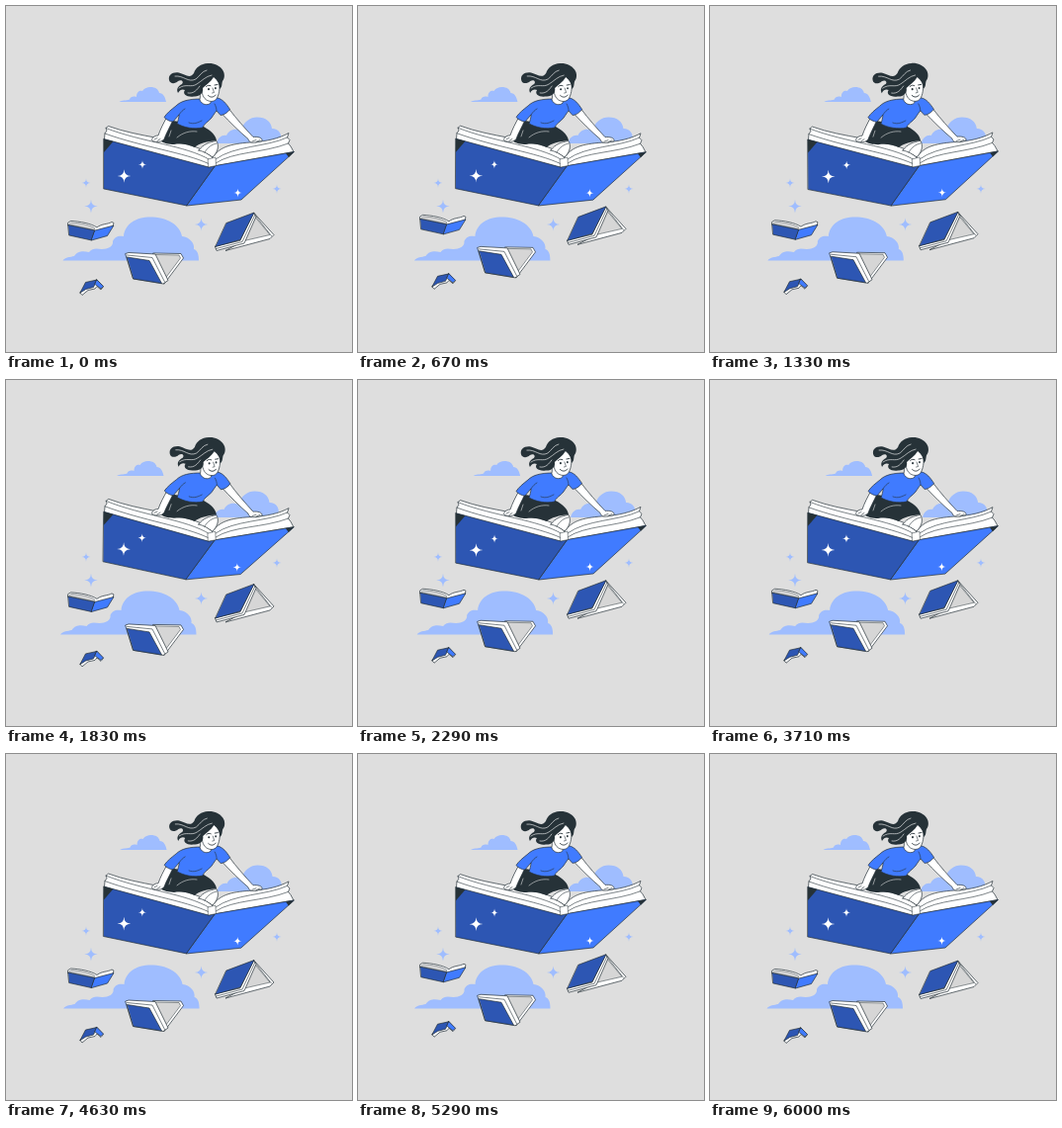
An HTML page with a canvas that plays this animation: 350 by 350 pixels, repeating every 6040 ms.

```html
<!DOCTYPE html>
<html lang="en">
<head>
<meta charset="utf-8">
<title>Flying book</title>
<style>
html, body { margin: 0; width: 100%; height: 100%; overflow: hidden; background: #dedede; }
canvas { display: block; width: 350px; height: 350px; }
</style>
</head>
<body>
<canvas id="stage"></canvas>
<script>
const LOOP = 6040, SPAN = 6000, BEAT = 1500, SIZE = 350;
const INK = '#263238', BLUE = '#407bff', DEEP = '#2d56b3', SKY = '#9fbdff', WHITE = '#fff', GREY = '#d6d6d6', PAPER = '#dedede';

const canvas = document.getElementById('stage');
const ctx = canvas.getContext('2d');
const ratio = window.devicePixelRatio || 1;
canvas.width = canvas.height = SIZE * ratio;

function shape(d, fill, stroke, width = 0.7) {
  const path = new Path2D(d);
  if (fill) { ctx.fillStyle = fill; ctx.fill(path); }
  if (stroke) { ctx.strokeStyle = stroke; ctx.lineWidth = width; ctx.stroke(path); }
}
const inked = (d, fill) => shape(d, fill, INK);
const line = (d, color = INK, width = 0.6) => shape(d, null, color, width);

function star(x, y, r, color) {
  const k = r * 0.03;
  ctx.beginPath();
  ctx.moveTo(x, y - r);
  ctx.quadraticCurveTo(x + k, y - k, x + r, y);
  ctx.quadraticCurveTo(x + k, y + k, x, y + r);
  ctx.quadraticCurveTo(x - k, y + k, x - r, y);
  ctx.quadraticCurveTo(x - k, y - k, x, y - r);
  ctx.fillStyle = color;
  ctx.fill();
}

function moved(dx, dy, draw) {
  ctx.save();
  ctx.translate(dx, dy);
  draw();
  ctx.restore();
}

const ease = p => (1 - Math.cos(Math.PI * p)) / 2;

// Sideways shake, one stop every tenth of the span
const STOPS = [0, -1, 2, -4, 4, -4, 4, -4, 2, -1, 0];
function shake(t) {
  const p = t / SPAN * 10, i = Math.min(9, Math.floor(p));
  return 0.63 * (STOPS[i] + (STOPS[i + 1] - STOPS[i]) * ease(p - i));
}
const float = t => -6.3 * ease(2 * t / BEAT);

// Triangle wave: up at 1/4, down at 3/4
function sway(t) {
  const p = t / BEAT % 1;
  return p < 0.25 ? 4 * p : p < 0.75 ? 2 - 4 * p : 4 * p - 4;
}

function clouds() {
  shape('M114.5 97C117 95 121 96 125 94.5C126 91.5 129 91 132 92C132 86 136 85 138 86C140 83 143 82 146 82C151 82 154 84 155 88C159 88 161 92 162 97Z', SKY);
  shape('M213 139C214 133 219 130 223 131C225 126 231 123 238 126C240 117 247 112.5 254 112.5C263 112.5 268 117 269 124C276 124 279 130 278 134C280 134 281 137 281 139Z', SKY);
  shape('M57.5 257.5C60 254 65 254 69 253C73 247 79 248 84 249C88 244 93 246 97 246C103 246 109 243 108 238C110 233 114 232 119 233C120 221 131 213.5 146 213.5C162 213.5 176 221 178 233C186 234 191 240 190 246C194 247 195 252 195 257.5Z', SKY);
}

function bigBook() {
  // page blocks
  inked('M99.5 135L100 129L102 126L101 123.5L103.5 121.5C135 133 172 134 198 145L209 153L213 162L205 163.5Z', WHITE);
  inked('M209 153C216 143 226 139.5 247 138C264 137 276 134 286 128.5L284.5 133L287 135.5L285.5 139L288 142L291 147.5L211 162Z', WHITE);
  line('M101 123.5C138 138 182 141 206 155.5');
  line('M100 129C139 143 180 148 205 159.5');
  line('M284.5 133C263 143 231 141 212 155');
  line('M285.5 139C260 149 230 147 212 159');
  inked('M195 146C199 140 206 137.5 213 136.5C216 142 214 148 209 153C205 150 200 147 195 146Z', WHITE);
  line('M201 148C204 143 208 140 213 139');
  // covers
  inked('M99 134.5L205 163L212 161.5L183 202L99 185Z', DEEP);
  inked('M212 161.5L291.5 147.5L238 196L183 202Z', BLUE);
  shape('M99 134.5L108.5 137L99 148Z', INK);
  shape('M291.5 147.5L283 149L286 153Z', INK);
  shape('M204.5 155L212 153L212.5 161.5L205 163Z', WHITE, INK, 0.5);
  star(119.5, 172, 6.8, WHITE);
  star(138, 160.5, 4.2, WHITE);
  star(234.5, 189, 4.2, WHITE);
}

function rider() {
  // legs
  shape('M169 116C164 121 160 128 156 136C159 139 165 140 170 140C178 139 184 140 191 143C195 139 204 137 213 136C212 129 204 124 198 121Z', INK);
  line('M173 133C179 128 186 126 193 127', WHITE, 0.5);
  line('M167 126L165 132', WHITE, 0.5);
  // forearms and hands
  inked('M163 112C159 119 156 125 154 131C150 131 146.5 134 148 136.5C152 138 158 138 160 134.5C162 129 166 122 169 115Z', WHITE);
  line('M150 135L153 133.5M153 136.5L156 134.5');
  inked('M218 108.5C226 117 236 127 245 134.5C246 139 250 138 253 138L259 136.5C260 133 254 132 250 132.5C242 124 233 114 225.5 104Z', WHITE);
  line('M249 137L253 135.5M253 137.5L257 135.5');
  // top
  inked('M197 94C185 94 177 96 172 101C167 105 163 108 160 112.5C162 115 166 117 169 117L175 110C175 113 174 116 173 119C180 123 190 125 199 123C200 119 205 117 208 113C210 110 212 107 213 106L217 110.5C221 110 224 108 226.5 104.5C223 99 219 94 214 93Z', BLUE);
  line('M175 110C177 107 179 105 181 104M213 106C213 103 212 101 211 99M185 118C190 120 194 118 198 116');
  // neck and face
  inked('M196 86C197 91 196 94 196 95C198 100 204 101 207 98L208 92Z', WHITE);
  inked('M199 79C197 84 198 90 201 93.5C204 97 211 98 213.5 93C216 88 217 80 215 73L207 70Z', WHITE);
  // hair
  shape('M216 84C219 82 218 79 219 76C221.5 73 221.5 68 219 64.5C216 60 210 57.5 204 58C197 58.5 192 62 190 68C186 74 181 69 175 67.5C168 66.5 164 70 165 75C166 79 171 79 174 76C178 74 180 77 178 79C174 81 172 84 174 88C176 84 179 84 181 85C178 89 183 92.5 190 91.5C196 92 200 88 199 83C202 80 207 77 210 72C214 75 216 79 216 84Z', INK);
  line('M171 71C180 70 184 78 192 74C196 71 198 66 203 65', WHITE, 0.6);
  line('M175 83C182 78 187 83 193 79C198 76 202 71 208 70', WHITE, 0.6);
  line('M184 88C190 89 193 85 196 81', WHITE, 0.6);
  // features
  line('M202.5 81.5C204 80 205.5 80 207 80.7M211 80L214 79.5', INK, 0.9);
  shape('M204 84.2a1 1.1 0 1 0 2 0a1 1.1 0 1 0 -2 0ZM211 83.2a.9 1.1 0 1 0 1.8 0a.9 1.1 0 1 0 -1.8 0Z', INK);
  line('M209 83L210.5 87.5L208.5 88');
  line('M204.5 90.5C207 93 210 92.5 212 90', INK, 0.9);
}

function openBook() {
  inked('M63 219L65.5 217.5C75 218 86 220 92 224C97 220 103 221 107 218.5L109 219.5L108 223L90 228L63 222Z', WHITE);
  shape('M66 219C75 219.5 84 221 90 225L89 226.5L64 221Z', GREY, INK, 0.4);
  inked('M63 221.5L90 227L86.5 237L64 232Z', DEEP);
  inked('M90 227L109 222L102.5 232.5L86.5 237Z', BLUE);
}

function tentBook() {
  inked('M251 209.5L271 231.5L267 235.5L222 247.5L240 238Z', WHITE);
  shape('M252.5 214L267 231.5L241 237.5Z', GREY, INK, 0.5);
  line('M251.5 211L268.5 232.5');
  inked('M211.5 243.5L213 247.5L241 240L253 213L250.5 209L237 237Z', WHITE);
  line('M212.5 245.5L239 238.5L252 211');
  inked('M223 219.5L251 209L237 236.5L212 243.5Z', DEEP);
}

function wideBook() {
  inked('M149 250L177 250.5L179.5 255L160 281Z', WHITE);
  shape('M151 251.5L175 252L176.5 255L160 277Z', GREY, INK, 0.5);
  inked('M121 250.5L124 249.5L151 251L164 277.5L159 281L129 276Z', WHITE);
  line('M122.5 252L148 254.5L160.5 279');
  inked('M122.5 254L145 257.5L157.5 280.5L129 276Z', DEEP);
}

function tinyBook() {
  inked('M75 290L77 292.5L83 287.5L90 286L92 283.5L96 287L98.5 284L92 277Z', WHITE);
  inked('M75 290L80.5 279.5L92 277L88.5 284.5L81 286.5Z', DEEP);
  inked('M92 277L98.5 283.5L96 286L90 281.5Z', BLUE);
}

function render(t) {
  ctx.setTransform(ratio, 0, 0, ratio, 0, 0);
  ctx.lineJoin = ctx.lineCap = 'round';
  ctx.fillStyle = PAPER;
  ctx.fillRect(0, 0, SIZE, SIZE);
  moved(shake(t), 0, clouds);
  star(81, 179, 4.4, SKY);
  star(86, 202.5, 6.8, SKY);
  star(197.5, 221, 6.6, SKY);
  star(274, 185, 4.4, SKY);
  ctx.save();
  ctx.translate(195, 135);
  ctx.rotate(sway(t) * 0.8 * Math.PI / 180);
  ctx.translate(-195, -135);
  bigBook();
  rider();
  ctx.restore();
  moved(0, float(t), () => {
    openBook();
    tentBook();
    wideBook();
    tinyBook();
  });
}

const start = performance.now();
function tick(now) {
  render(Math.min(SPAN, Math.max(0, now - start) % LOOP));
  requestAnimationFrame(tick);
}
render(0);
requestAnimationFrame(tick);
</script>
</body>
</html>
```
